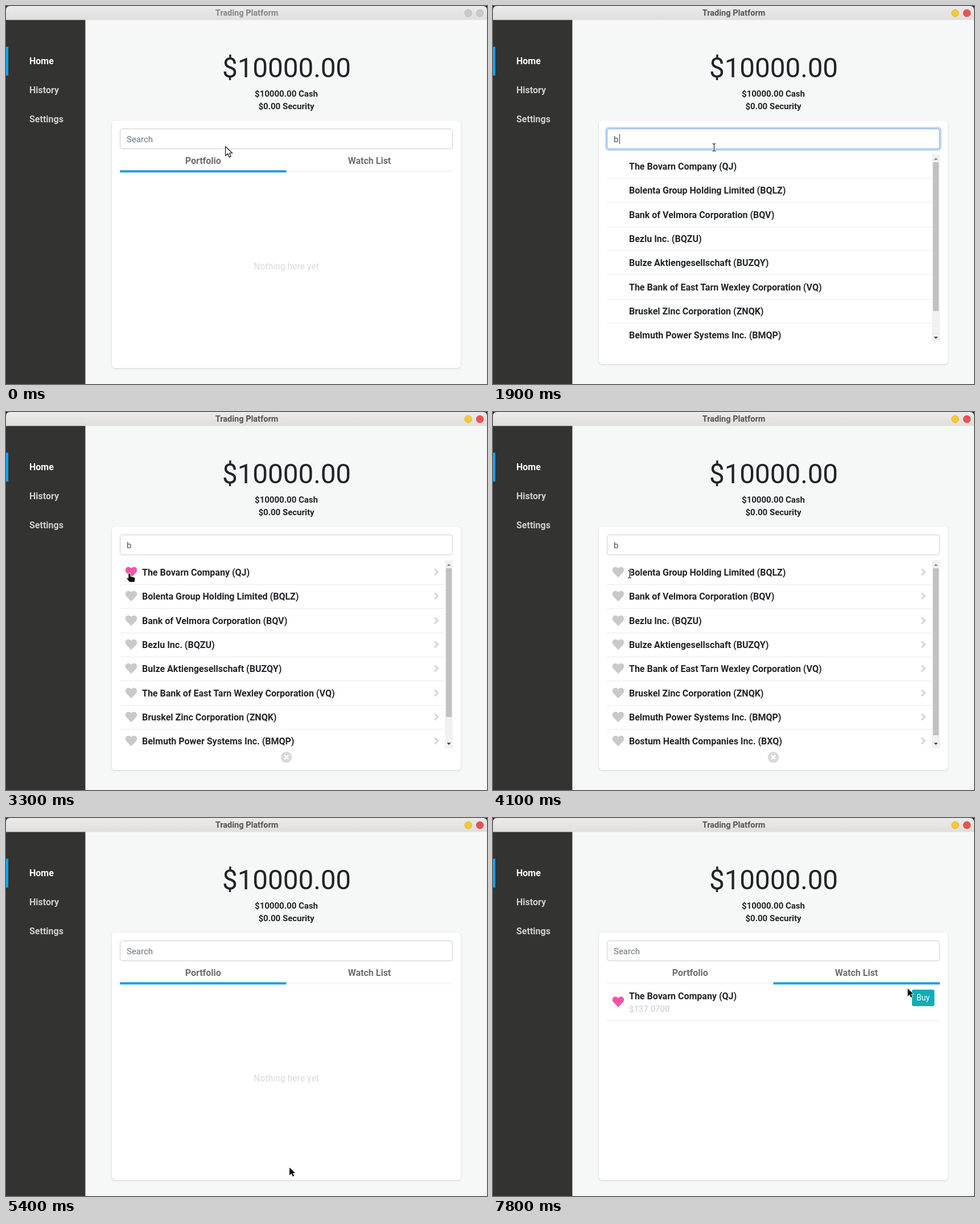
Animation, 845 px wide and 663 px high, one loop 8 s. Source, as an HTML page:

```html
<!DOCTYPE html>
<html lang="en">
<head>
<meta charset="utf-8">
<title>Trading Platform</title>
<style>
  html, body { margin: 0; width: 100%; height: 100%; overflow: hidden; background: #241c22; }
  svg { display: block; }
  text { font: 15.8px Roboto, "Noto Sans", sans-serif; fill: #212529; white-space: pre; }
  .bold { font-size: 16px; font-weight: 700; }
  .mid { text-anchor: middle; }
  .title { font-size: 14.5px; fill: #868583; }
  .focused .title { fill: #555452; }
  .button { fill: #cbc9c7; stroke: #bfbdbb; }
  .focused .minimize { fill: #f3cb33; stroke: #dcb840; }
  .focused .close { fill: #ef5152; stroke: #dc4c4c; }
  .nav { fill: #cfcfce; }
  .nav.on { fill: #fff; }
  .total { font-size: 47.5px; }
  .sum { font-size: 15px; }
  .tab { fill: #6d6d6d; }
  .faint { fill: #dadada; }
  .price { font-size: 15px; fill: #c9c9c9; }
  .card { fill: #fefffe; filter: drop-shadow(0 1px 1.5px rgba(0, 0, 0, .16)); }
  .heart { fill: #c9c9c9; }
  .heart.liked { fill: #f653a6; }
  .buy { font-size: 14px; fill: #fff; }
  .line { stroke: #ebebeb; }
  .stroke { fill: none; stroke: #d6d6d6; stroke-width: 3; }
  .halo { stroke: #fff; stroke-width: 2; stroke-linejoin: round; paint-order: stroke; }
  #query { font-size: 15px; }
</style>
</head>
<body>
<svg id="stage" width="845" height="663" viewBox="0 0 845 663">
  <defs>
    <linearGradient id="chrome" x2="0" y2="1">
      <stop stop-color="#ecebe9"/><stop offset="1" stop-color="#dfdedb"/>
    </linearGradient>
    <clipPath id="listClip"><path d="M200 260H785V590H200Z"/></clipPath>
    <path id="heart" d="M0 9.2L-8.5 .4C-11-2.4-10.6-6.4-8-8.3C-5.6-9.9-2.3-9.4 0-6.7C2.3-9.4 5.6-9.9 8-8.3C10.6-6.4 11-2.4 8.5 .4Z"/>
    <path id="arrowShape" d="M0 0V16.2L4 12.6L6.6 18.6L9.6 17.3L7 11.5H12Z"/>
  </defs>

  <path d="M139 24H845V663H139Z" fill="#f6f8f8"/>
  <path d="M0 24H139.4V663H0Z" fill="#333331"/>
  <path d="M0 24.6V7Q0 0 7 0H838Q845 0 845 7V24.6Z" fill="url(#chrome)"/>
  <text class="title bold mid" x="423" y="17">Trading Platform</text>
  <circle class="button minimize" cx="812" cy="12.5" r="6.3"/>
  <circle class="button close" cx="832.5" cy="12.5" r="6.3"/>

  <path d="M0 71.4H4V122H0Z" fill="#0fa4fa"/>
  <text class="nav on bold" x="41" y="102">Home</text>
  <text class="nav bold" x="41" y="153">History</text>
  <text class="nav bold" x="41" y="204">Settings</text>

  <text class="total mid" x="493" y="125">$10000.00</text>
  <text class="bold sum mid" x="492.5" y="159">$10000.00 Cash</text>
  <text class="bold sum mid" x="492.5" y="181">$0.00 Security</text>

  <rect id="card" class="card" x="186" y="201" width="613" height="434" rx="6"/>
  <rect x="200.5" y="215.5" width="584" height="35" rx="4" fill="#fff" stroke="#cbcdcf"/>
  <g id="ring" fill="none">
    <rect x="198.5" y="213.5" width="588" height="39" rx="5" stroke="#bfd8f8" stroke-width="3"/>
    <rect x="200.5" y="215.5" width="584" height="35" rx="4" stroke="#7faae2"/>
  </g>
  <text id="query" x="212" y="239"></text>
  <path id="caret" d="M0 225V242" stroke="#333"/>

  <g id="home">
    <text class="tab bold mid" x="346.3" y="277">Portfolio</text>
    <text class="tab bold mid" x="638.5" y="277">Watch List</text>
    <path d="M200 288H785V292H200Z" fill="#f6f7f7"/>
    <path id="leftBar" d="M200 288H492.5V292H200Z" fill="#2a9fe0"/>
    <path id="rightBar" d="M492.5 288H785V292H492.5Z" fill="#2a9fe0"/>
    <text id="empty" class="faint mid" x="492.5" y="462">Nothing here yet</text>
    <g id="watch">
      <use href="#heart" class="heart liked" x="220" y="322.5"/>
      <text class="bold company" x="239" y="318"></text>
      <text class="price" x="239" y="340">$137.0700</text>
      <rect x="736" y="301" width="39.5" height="29" rx="3" fill="#12acb7"/>
      <text class="buy mid" x="755.5" y="320">Buy</text>
      <path d="M200 355.5H785" stroke="#f2f3f3" stroke-width="2"/>
    </g>
  </g>

  <g id="results">
    <g id="rows" clip-path="url(#listClip)"></g>
    <path d="M771 260H785V590H771Z" fill="#f1f1f1"/>
    <path d="M774.5 270L778 266L781.5 270Z" fill="#8b8b8b"/>
    <path d="M774.5 580L778 584L781.5 580Z" fill="#444"/>
    <rect id="thumb" x="773" y="274" width="10" fill="#c1c1c1"/>
    <g class="icon">
      <circle id="clear" cx="492.5" cy="605.5" r="9.8"/>
      <path d="M489 602l7 7m0-7l-7 7" stroke="#fff" stroke-width="2.7"/>
    </g>
  </g>

  <g id="pointer">
    <use id="light" href="#arrowShape" fill="#fff" stroke="#111" stroke-width="1.2"/>
    <use id="arrow" href="#arrowShape" class="halo" fill="#111" transform="scale(.85)"/>
    <path id="hand" class="halo" fill="#111" d="M-1.8 1Q0-.8 1.6 1V5.5L8.2 7.2Q9.8 7.8 9.6 9.5L8.5 15H0L-4.3 9.7Q-4.6 7.7-2.6 8.1L-1.8 8.8Z"/>
    <g id="beam" fill="none">
      <path d="M-3-6.5Q0-6.5 0-5Q0-6.5 3-6.5M0-5V5M-3 6.5Q0 6.5 0 5Q0 6.5 3 6.5" stroke="#fff" stroke-width="3"/>
      <path d="M-3-6.5Q0-6.5 0-5Q0-6.5 3-6.5M0-5V5M-3 6.5Q0 6.5 0 5Q0 6.5 3 6.5" stroke="#222" stroke-width="1.2"/>
    </g>
  </g>
</svg>
<script>
  const LOOP = 8000, ROW = 42.3;
  const $ = id => document.getElementById(id);

  const companies = [
    'The Bovarn Company (QJ)',
    'Bolenta Group Holding Limited (BQLZ)',
    'Bank of Velmora Corporation (BQV)',
    'Bezlu Inc. (BQZU)',
    'Bulze Aktiengesellschaft (BUZQY)',
    'The Bank of East Tarn Wexley Corporation (VQ)',
    'Bruskel Zinc Corporation (ZNQK)',
    'Belmuth Power Systems Inc. (BMQP)',
    'Bostum Health Companies Inc. (BXQ)'
  ];

  // [time, shape, x, y]
  const moves = [
    [0, 'light', 385.5, 246.5], [100, 'beam', 388.5, 249], [1400, 'beam', 388.5, 248],
    [2600, 'arrow', 352, 261], [2700, 'beam', 292, 279], [2800, 'hand', 249.5, 281], [2900, 'hand', 217, 283],
    [3800, 'hand', 216.5, 283.5],
    [4100, 'beam', 240, 284.5], [4200, 'beam', 256, 300], [4300, 'arrow', 288, 340], [4400, 'arrow', 332, 392],
    [4500, 'arrow', 384, 454], [4600, 'arrow', 430, 522], [4700, 'arrow', 470, 586],
    [4800, 'arrow', 497, 623], [4900, 'hand', 499, 616], [5000, 'hand', 498.5, 613],
    [5400, 'arrow', 498, 613], [5600, 'arrow', 520, 562], [5700, 'arrow', 568, 452],
    [5800, 'arrow', 612, 350], [5900, 'arrow', 626, 307],
    [6100, 'arrow', 626, 300], [6200, 'arrow', 626, 294.5], [6300, 'hand', 625, 284], [6400, 'hand', 624, 276],
    [7700, 'hand', 765, 311], [7800, 'arrow', 728.5, 299]
  ];
  const ringSteps = [[0, 0], [1000, .3], [1100, .8], [1200, 1], [3100, .7], [3200, .25], [3300, 0]];
  const barSteps = [[0, 0], [6300, .5], [6400, 1]];

  const latest = (steps, t) => steps.findLast(step => step[0] <= t);
  const within = (t, from, to) => t >= from && t < to;
  const show = (node, on) => node.style.display = on ? '' : 'none';

  $('rows').innerHTML = Array.from({ length: 8 }, (_, i) => `
    <g transform="translate(0 ${Math.round(i * ROW)})">
      <use href="#heart" class="heart icon" x="220" y="281"/>
      <text class="bold" x="239" y="287"></text>
      <path class="stroke icon" d="M753 275.2l5.5 5.5-5.5 5.5"/>
      <path class="line" d="M200 302.5H771"/>
    </g>`).join('');
  document.querySelector('.company').textContent = companies[0];

  const labels = document.querySelectorAll('#rows text');
  const icons = document.querySelectorAll('.icon');
  const firstHeart = document.querySelector('#rows .heart');

  function draw(t) {
    const searching = within(t, 1900, 5400);
    const removed = t >= 3500 ? 1 : 0;
    const watching = t >= 6900;

    $('stage').classList.toggle('focused', t >= 800);
    $('ring').style.opacity = latest(ringSteps, t)[1];
    $('query').textContent = searching ? 'b' : 'Search';
    $('query').style.fill = searching ? '#495057' : '#6c757d';
    show($('caret'), within(t, 1000, 1600) || within(t, 1900, 2600));
    $('caret').setAttribute('transform', `translate(${searching ? 222.5 : 212.5})`);

    $('card').setAttribute('height', searching ? 427 : 434);
    show($('home'), !searching);
    show($('results'), searching);

    labels.forEach((label, i) => label.textContent = companies[i + removed]);
    icons.forEach(icon => show(icon, t >= 2100));
    firstHeart.classList.toggle('liked', within(t, 2800, 4100));
    $('thumb').setAttribute('height', removed ? 293 : 261);
    $('clear').style.fill = t >= 4900 ? '#6e6e6e' : '#d9d9d9';

    show($('leftBar'), !watching);
    show($('empty'), !watching);
    show($('watch'), watching);
    $('rightBar').style.opacity = latest(barSteps, t)[1];

    const [, shape, x, y] = latest(moves, t);
    for (const id of ['light', 'arrow', 'hand', 'beam']) show($(id), id === shape);
    $('pointer').setAttribute('transform', `translate(${x} ${y})`);
  }

  const start = performance.now();
  function frame() {
    draw((performance.now() - start) % LOOP);
    requestAnimationFrame(frame);
  }
  frame();
</script>
</body>
</html>
```
